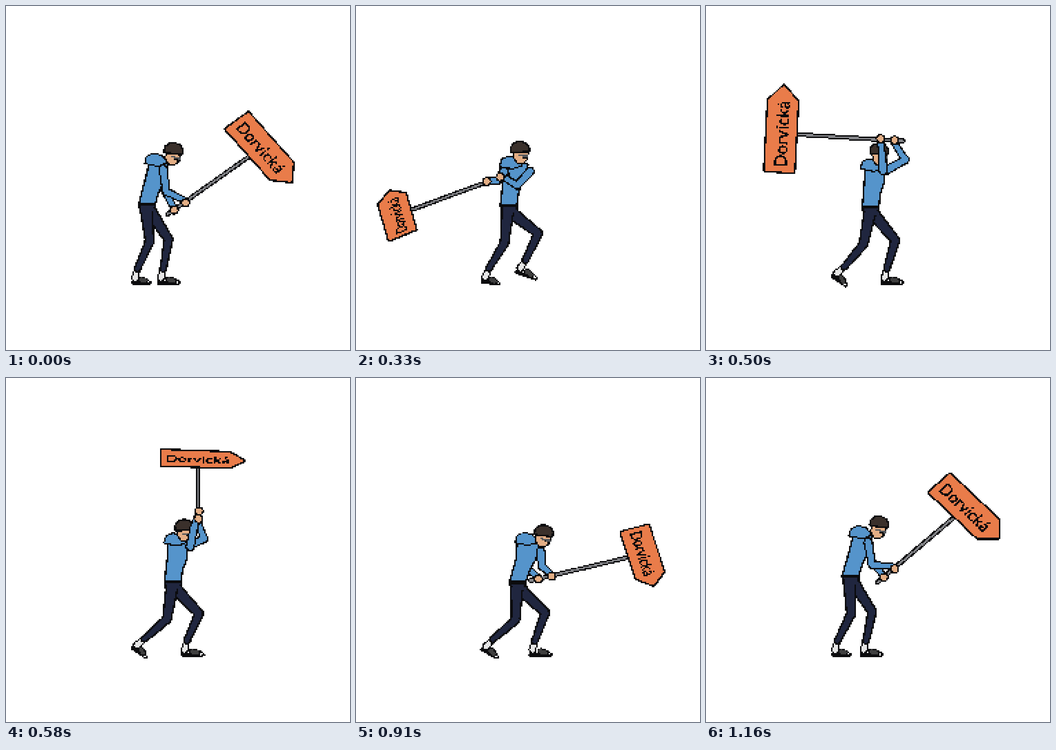
Write an HTML page with a canvas that moves like this. It is 748x748 px and loops after 1.3 s.

```html
<!DOCTYPE html>
<html lang="cs">
<head>
<meta charset="utf-8">
<title>Sign swing</title>
<style>
html, body { margin: 0; width: 100%; height: 100%; overflow: hidden; background: #fff; }
canvas { display: block; width: 100vw; height: 100vh; image-rendering: pixelated; }
</style>
</head>
<body>
<canvas id="stage" width="250" height="250"></canvas>
<script>
const SIZE = 250, SCALE = SIZE / 748, LOOP = 1300, FRAMES = 15, EDGE = 3.8;
const BLACK = 0x0b0b0d, BLUE = 0x5594cb, PANTS = 0x20263f, SKIN = 0xe3ae85, HAIR = 0x3a302b,
      SOCK = 0xe6e6e6, SHOE = 0x3f3f3f, STEEL = 0x85868a, ORANGE = 0xe97c4a, LENS = 0x55585c;
const LABEL = 'Dorvická';

// Key poses; the rig below works out every joint from them.
// turn: -1 chest to viewer, 0 side on, 1 back to viewer; bend: how far each elbow sticks out
// pole: butt x, y, direction, distance to sign | board: length, angle to the pole
const tracks = {};
function key(t, parts) {
  for (const name in parts) (tracks[name] ||= []).push({ t, v: [parts[name]].flat() });
}
key(0,    { waist: [307, 430], head: [363, 322], turn: .1,  bend: [6, 22],    step: 342, pole: [351, 453, -33, 251], board: [178, 81] });
key(160,  { waist: [315, 433], head: [343, 319], turn: -.5, bend: [3, 16],    step: 346, pole: [352, 438, 3.5, 82],  board: [183, 46] });
key(330,  { waist: [332, 433], head: [357, 319], turn: -1,  bend: [-25, -10], step: 368, pole: [331, 366, 161, 258], board: [99, 93] });
key(500,  { waist: [358, 437], head: [377, 323], turn: -.1, bend: [34, 0],    step: 393, pole: [429, 294, 186, 266], board: [188, 87] });
key(580,  { pole: [418, 316, 274, 140], board: [180, 88] });
key(660,  { pole: [430, 392, 357, 240], board: [175, 98] });
key(750,  { waist: [373, 455], head: [411, 353], turn: .9,  bend: [24, -7],   step: 394, pole: [357, 431, 403, 243], board: [147, 102] });
key(1000, { waist: [340, 437], head: [405, 339], turn: .5,  bend: [3, 21],    step: 386, pole: [391, 446, 317.5, 259], board: [120, 73] });
key(1160, { waist: [314, 431], head: [375, 325], turn: .15, bend: [6, 29],    step: 348, pole: [373, 444, 322, 252], board: [176, 81] });

function poseAt(t) {
  const pose = {};
  for (const name in tracks) {
    const keys = tracks[name], next = keys.findIndex(k => k.t >= t);
    const b = keys[next], a = keys[Math.max(0, next - 1)];
    const f = a === b ? 0 : (t - a.t) / (b.t - a.t);
    pose[name] = a.v.map((n, i) => n + (b.v[i] - n) * f);
  }
  return pose;
}

// Points
const clamp = n => Math.min(1, Math.max(0, n));
const add = (p, x, y) => [p[0] + x, p[1] + y];
const mix = (p, q, f) => add(p, (q[0] - p[0]) * f, (q[1] - p[1]) * f);
const polar = (r, deg) => [r * Math.cos(deg * Math.PI / 180), r * Math.sin(deg * Math.PI / 180)];

function place(origin, deg, ...list) {
  const [cos, sin] = polar(1, deg), out = [];
  for (let i = 0; i < list.length; i += 2)
    out.push(add(origin, list[i] * cos - list[i + 1] * sin, list[i] * sin + list[i + 1] * cos));
  return out;
}

function elbow(a, b, bend) {
  const dx = b[0] - a[0], dy = b[1] - a[1], len = Math.hypot(dx, dy) || 1;
  return add(mix(a, b, .5), -dy / len * bend, dx / len * bend);
}

// Two bones of fixed length, bending to the right.
function knee(hip, ankle, thigh = 69, shin = 66) {
  const d = Math.min(Math.hypot(ankle[0] - hip[0], ankle[1] - hip[1]), thigh + shin - 1);
  const along = (thigh ** 2 - shin ** 2 + d * d) / (2 * d);
  const out = Math.sqrt(Math.max(0, thigh ** 2 - along ** 2));
  return add(mix(hip, ankle, along / d), (ankle[1] - hip[1]) / d * out, (hip[0] - ankle[0]) / d * out);
}

// Hard-edged drawing: each shape is a mask, copied without soft pixels.
const mask = Object.assign(document.createElement('canvas'), { width: SIZE, height: SIZE });
const c = mask.getContext('2d', { willReadFrequently: true });
c.lineJoin = 'round';
let pixels;

function ink(color, shape, level = 127) {
  c.setTransform(1, 0, 0, 1, 0, 0);
  c.clearRect(0, 0, SIZE, SIZE);
  c.setTransform(SCALE, 0, 0, SCALE, 0, 0);
  shape();
  const src = c.getImageData(0, 0, SIZE, SIZE).data;
  const abgr = (0xff000000 | (color & 255) << 16 | color & 0xff00 | color >> 16) >>> 0;
  for (let i = 0; i < pixels.length; i++) if (src[i * 4 + 3] > level) pixels[i] = abgr;
}

function trace(points) {
  c.beginPath();
  points.forEach(p => c.lineTo(...p));
  c.closePath();
}

function poly(color, points, edge = EDGE) {
  if (edge) ink(BLACK, () => { trace(points); c.lineWidth = edge * 2; c.fill(); c.stroke(); });
  ink(color, () => { trace(points); c.fill(); });
}

// Rounded, tapering limb through its joints.
function limb(color, joints, widths, edge = EDGE) {
  const fill = grow => () => joints.forEach(([x, y], i) => {
    const r = widths[i] / 2 + grow;
    c.beginPath(); c.arc(x, y, r, 0, 7); c.fill();
    if (!i) return;
    const [px, py] = joints[i - 1], pr = widths[i - 1] / 2 + grow;
    const a = Math.atan2(y - py, x - px), nx = -Math.sin(a), ny = Math.cos(a);
    trace([[px + nx * pr, py + ny * pr], [x + nx * r, y + ny * r],
           [x - nx * r, y - ny * r], [px - nx * pr, py - ny * pr]]);
    c.fill();
  });
  if (edge) ink(BLACK, fill(edge));
  ink(color, fill(0));
}

// Body parts
function leg(hip, ankle, tilt, size) {
  const [heel, instep, toe] = place(ankle, tilt, -9, 30, -5, 20, size - 10, 30);
  limb(SOCK, [ankle, instep], [8, 11], 3);
  limb(BLACK, [heel, toe], [9, 8], 0);
  limb(SOCK, place(toe, tilt, -8, -3, -3, -1), [6, 4], 2.5);
  limb(SHOE, place(toe, tilt, -size * .52, -7, -size * .27, -4), [9, 8], 2.5);
  limb(PANTS, [hip, knee(hip, ankle), ankle], [21, 14, 9]);
}

const arm = a => limb(BLUE, [a.shoulder, elbow(a.shoulder, a.hand, a.bend), mix(a.shoulder, a.hand, .92)], [14, 12, 9], 3.2);
const hand = a => limb(SKIN, [a.hand], [14], 3);

function drawHead(at, tilt, away) {
  if (away) {
    poly(SKIN, place(at, 0, 2, 2, 10, 2, 10, 17, 3, 14), 3);
    poly(HAIR, place(at, 0, -17, -4, -13, -15, -4, -20, 6, -20, 14, -13, 16, -2, 9, 5, -10, 4));
    return;
  }
  poly(SKIN, place(at, tilt, -14, -4, 16, -4, 15, 12, 7, 21, -5, 22, -13, 11), 3);
  poly(HAIR, place(at, tilt, -18, -2, -18, -12, -11, -20, 0, -23, 11, -20, 18, -11, 18, -4));
  limb(LENS, place(at, tilt, -3, 6, 16, 7), [3, 6], 0);
  limb(BLACK, place(at, tilt, 6, 10, 13, 11), [3, 3], 0);
}

function drawSign([x, y, dir, reach], [length, angle]) {
  const center = add([x, y], ...polar(reach, dir));
  const u = polar(length, dir + angle), v = polar(reach * .122, dir + 177);
  const at = (s, t) => add(center, u[0] * s + v[0] * t, u[1] * s + v[1] * t);
  limb(STEEL, [[x, y], at(-.06, 1)], [4, 4], 3);
  poly(ORANGE, [at(-.5, -1), at(.32, -1), at(.5, 0), at(.32, 1), at(-.5, 1)]);
  ink(BLACK, () => {
    c.transform(u[0] / 188, u[1] / 188, v[0] / 32, v[1] / 32, ...center);
    c.font = '37px Lato, "Open Sans", sans-serif';
    c.textAlign = 'center';
    c.fillText(LABEL, -12, 14);
  }, 85);
}

function paint(t) {
  const { waist, head, turn: [turn], bend, step: [step], pole, board } = poseAt(t);
  const away = turn > .7, chestOut = turn < -.5;
  const lean = head[0] - waist[0];
  const neck = add(head, -.55 * lean, 32 - .25 * lean);

  // Hands hold the pole at fixed distances, shortened along with it.
  const grip = f => add(pole, ...polar(f * pole[3] / 255, pole[2]));
  const raise = 15 * clamp((neck[1] - grip(18)[1]) / 60);
  const [left, right] = [[-1, 18], [1, 48]].map(([side, f], i) => ({
    shoulder: add(neck, 7 + raise + side * 28 * turn, 15 - raise / 2), hand: grip(f), bend: bend[i]
  }));

  // The rear heel lifts as the hips move forward; the front foot steps in an arc.
  const push = clamp((waist[0] - 325) / 35);
  const lift = t < 500 ? 21 * Math.sin(Math.PI * t / 500) : 0;

  const half = 17 + 12 * Math.abs(turn);
  const spine = (f, x) => add(mix(neck, waist, f), x, 0);
  const torso = [spine(0, -half), spine(.4, -17), spine(1, -16), spine(1, 16), spine(.7, 16), spine(.38, 22), spine(0, half)];
  const pelvis = inset => place(waist, 0, inset - 16, 0, 16 - inset, 0, 17 - inset, 16, inset - 13, 16);
  const hood = place(add(neck, 0, -12 * Math.max(0, turn)), 0,
    -29, 3, -25, -11, -11, -17, 6, -13, 17, 1, -2, 8, -16, 5);

  if (!chestOut && !away) arm(left);
  poly(PANTS, pelvis(0));
  leg(add(waist, 9, 19), [step, 572 - lift], lift, 45);
  if (away) {
    drawSign(pole, board);
    [left, right].forEach(arm);
    [left, right].forEach(hand);
  }
  leg(add(waist, -2, 13), [286 + 15 * push, 572 - 4 * push], 37 * push, 37);
  poly(PANTS, pelvis(2), 0);

  poly(BLUE, torso);
  limb(BLACK, [torso[2], torso[3]], [5, 5], 0);
  poly(BLUE, hood, 3);
  drawHead(head, Math.max(0, lean - 25) / 3, away);
  if (away) return;

  drawSign(pole, board);
  if (chestOut) arm(left);
  arm(right);
  [left, right].forEach(hand);
}

const g = document.getElementById('stage').getContext('2d');
const cache = new Map();

function frame(t) {
  if (!cache.has(t)) {
    const image = new ImageData(SIZE, SIZE);
    pixels = new Uint32Array(image.data.buffer);
    pixels.fill(0xffffffff);
    paint(t);
    cache.set(t, image);
  }
  return cache.get(t);
}

// Twelve pictures a second, on whole hundredths.
const STEPS = Array.from({ length: FRAMES }, (_, i) => Math.round(i * 8.3) * 10);
let shown;
function tick() {
  const now = performance.now() % LOOP;
  const t = STEPS.findLast(s => s <= now);
  if (t !== shown) g.putImageData(frame(shown = t), 0, 0);
  requestAnimationFrame(tick);
}
tick();
</script>
</body>
</html>
```
